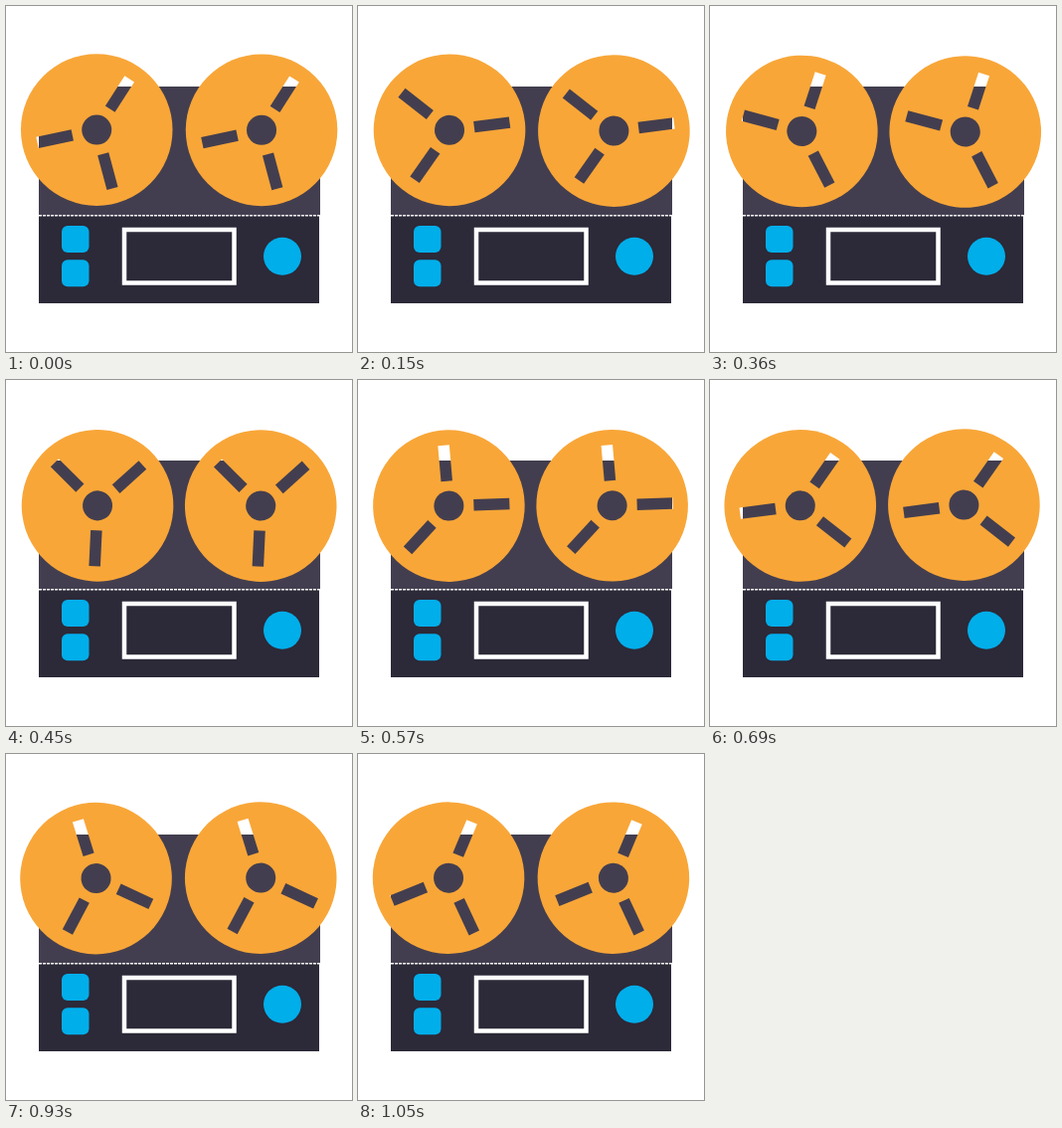
Animation, 348 px wide and 348 px high, one loop 1.08 s. Source, as an HTML page:

```html
<!DOCTYPE html>
<html>
<head>
<meta charset="utf-8">
<style>
  html, body { margin: 0; width: 100%; height: 100%; overflow: hidden; background: #fff; }
  svg { display: block; width: 100vw; height: 100vh; }
</style>
</head>
<body>
<svg viewBox="0 0 348 348">
  <defs>
    <mask id="slots" maskUnits="userSpaceOnUse" x="-80" y="-80" width="160" height="160">
      <circle r="78" fill="#fff"/>
      <g stroke="#000" stroke-width="11.5">
        <path id="slot" d="M25 0H61" transform="rotate(75)"/>
        <path d="M25 0H61" transform="rotate(168)"/>
        <path d="M25 0H61" transform="rotate(-57.3)"/>
      </g>
    </mask>
    <g id="reel">
      <circle r="76.3" fill="#f8a638" mask="url(#slots)"/>
      <circle r="15" fill="#433e4f"/>
    </g>
  </defs>

  <path d="M33 81H316V211H33Z" fill="#433e4f"/>
  <path d="M33 211H315V299H33Z" fill="#2c2938"/>
  <path d="M33 210.7H316" stroke="#fff" stroke-width="1.4" stroke-dasharray="3 1"/>
  <rect x="119" y="225" width="110.5" height="53.5" fill="none" stroke="#fff" stroke-width="4.5"/>
  <g fill="#00aeea">
    <rect x="56" y="221" width="27.5" height="27" rx="6"/>
    <rect x="56" y="255.300" width="27.5" height="27" rx="6"/>
    <circle cx="278" cy="251.700" r="19"/>
  </g>

  <use class="reel" href="#reel"/>
  <use class="reel" href="#reel"/>
</svg>
<script>
  const LOOP = 1080, STEP = 30, WOBBLE = 1;
  // Each reel turns about a pivot slightly off its centre.
  const pivots = [{ x: 91.4, y: 125.6, phase: -100 }, { x: 256.4, y: 125.6, phase: -50 }];
  const reels = document.querySelectorAll('.reel');
  const start = performance.now();

  function draw() {
    const time = (performance.now() - start) % LOOP;
    const turn = Math.floor(time / STEP) * STEP / LOOP * 360;
    pivots.forEach(({ x, y, phase }, i) => {
      const a = (turn + phase) * Math.PI / 180;
      const cx = x + WOBBLE * Math.cos(a), cy = y + WOBBLE * Math.sin(a);
      reels[i].setAttribute('transform', `translate(${cx} ${cy}) rotate(${turn})`);
    });
    requestAnimationFrame(draw);
  }
  draw();
</script>
</body>
</html>
```
